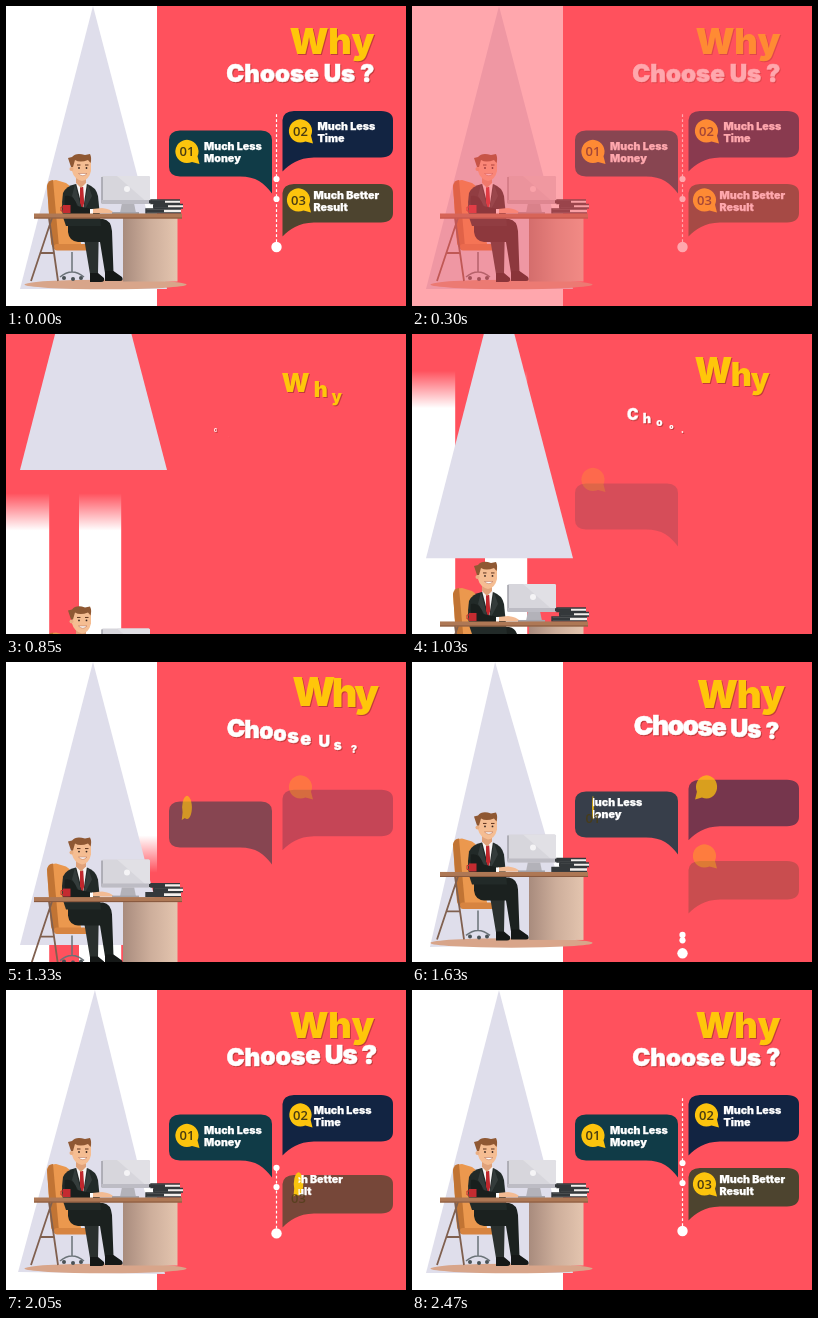
Animation of 400 by 300 pixels, one loop 2.53 s. Source, as an HTML page:

```html
<!DOCTYPE html>
<html lang="en">
<head>
<meta charset="utf-8">
<title>Why Choose Us ?</title>
<style>
html, body { margin: 0; width: 100%; height: 100%; overflow: hidden; background: #ff515d; }
svg { display: block; width: 100vw; height: 100vh; }
text { font-family: Inter, "Open Sans", sans-serif; font-weight: 900; }
.why { font-size: 36.2px; fill: #ffc60a; }
.choose { font-size: 24.1px; fill: #fff; stroke: #fff; stroke-width: .5px; }
.letters { filter: drop-shadow(1px 1px .6px rgba(120, 30, 20, .45)); }
.label { font-size: 10.7px; fill: #fff; stroke: #fff; stroke-width: .25px; }
.num { font: 600 13px "Open Sans", sans-serif; fill: #4a3c12; text-anchor: middle; }
.ruler { visibility: hidden; text-anchor: end; }
</style>
</head>
<body>
<svg viewBox="0 0 400 300">
  <defs>
    <linearGradient id="up" x2="0" y2="1">
      <stop offset="0" stop-color="#fff" stop-opacity="0"/>
      <stop offset=".11" stop-color="#fff"/>
    </linearGradient>
    <linearGradient id="down" x2="0" y2="1">
      <stop offset=".89" stop-color="#fff"/>
      <stop offset="1" stop-color="#fff" stop-opacity="0"/>
    </linearGradient>
    <linearGradient id="wood">
      <stop offset="0" stop-color="#a88b7d"/>
      <stop offset=".5" stop-color="#cdae9b"/>
      <stop offset="1" stop-color="#e4c5af"/>
    </linearGradient>
  </defs>
  <g id="all">
    <g id="rise" fill="url(#up)">
      <rect width="43.2" height="340"/>
      <rect x="73" width="42.2" height="340"/>
    </g>
    <g id="fall" fill="url(#down)">
      <rect x="43" width="30.2" height="340"/>
      <rect x="115" width="36" height="340"/>
    </g>
    <path id="beam" d="M87 0L161 283H14Z" fill="#dfdeeb"/>

    <g id="desk">
      <ellipse cx="99.500" cy="278.500" rx="81" ry="4.800" fill="#d8a58a"/>
      <!-- chair -->
      <path d="M66 246V266M54 271Q66 261 78 271" fill="none" stroke="#6b7378" stroke-width="1.500"/>
      <g fill="#4a5256">
        <circle cx="58" cy="272" r="2"/><circle cx="67" cy="273" r="2"/><circle cx="75" cy="272" r="2"/>
      </g>
      <path d="M41 180Q42 174 50 174L60 177Q66 180 68 192L75 238Q75 244 69 244H52Q46 243 45 236Z" fill="#eb984e"/>
      <path d="M41 180Q42 174 47 174L53 241L50 243Q46 242 45 236Z" fill="#c17434"/>
      <rect x="48" y="238" width="36" height="6.500" rx="3" fill="#d78440"/>
      <!-- legs -->
      <path d="M74 214H93L92 268H84L79 238Z" fill="#2a302e"/>
      <path d="M62 213H97Q105 214 106 225L107.500 267H99L94 236H72Q63 235 62 226Z" fill="#1b211f"/>
      <path d="M99 265H107.500L116 271Q118 275 114 275H99ZM84 267H92L98 272Q99 276 95 276H84Z" fill="#151817"/>
      <!-- body -->
      <path d="M57 187Q60 180 70 178H81Q90 181 92 190L95 220H60Q54 206 57 187Z" fill="#222a28"/>
      <path d="M70 177H81L77 204Z" fill="#f6f3f3"/>
      <path d="M74 181H77.200L78.200 197L76.300 203L74 197Z" fill="#c0272d"/>
      <path d="M69 178L76.500 207L66 190ZM82 178L77 207L86 190Z" fill="#343c3b"/>
      <path d="M70 169H80V177L75 182L70 177Z" fill="#e0a27a"/>
      <!-- head -->
      <path d="M66 155Q66 150 75 150T85 155V165Q83 174 76 175Q68 173 66 165Z" fill="#f5bd92"/>
      <circle cx="65.500" cy="163" r="2" fill="#eaae82"/>
      <path d="M65 161L62 152L66 151Q70 146 79 149L84 148Q86 152 84.500 157L82 154Q74 157 69 154L67 161Z" fill="#8f5833"/>
      <path d="M71 159H74.500M79 159H82.500" stroke="#60351f"/>
      <circle cx="73" cy="162" r=".9" fill="#35241d"/><circle cx="80.500" cy="162" r=".9" fill="#35241d"/>
      <path d="M72.500 167.500Q77 172 81 167.500Z" fill="#fff" stroke="#b5684c" stroke-width=".5"/>
      <!-- arms -->
      <path d="M59 190Q68 188 71 200L86 203V209H65Q57 203 59 190Z" fill="#191f1d"/>
      <path d="M86 203L96 202Q105 203 108 207H86Z" fill="#f3bb93"/>
      <path d="M84 203H87V208H84Z" fill="#fff"/>
      <!-- screen -->
      <path d="M116 197H128L130 207H114Z" fill="#b3b2b9"/>
      <rect x="95.500" y="170" width="48.500" height="28" rx="1.500" fill="#d7d6dc"/>
      <path d="M111 170H142.500Q144 170 144 172V196.500L143 198Z" fill="#e1e0e5"/>
      <path d="M96 171V197" stroke="#84848d"/>
      <path d="M95.500 194H144V198H95.500Z" fill="#bdbcc4"/>
      <circle cx="121" cy="183" r="3" fill="#f5f4f6"/>
      <path d="M106 206H133V208H106Z" fill="#a4a3aa"/>
      <!-- books -->
      <g fill="#f3efec" stroke="#34383b" stroke-width="1.400">
        <path d="M174 194H145V197.500H174M177 198.500H148V202H177M175 203H140V207H175"/>
      </g>
      <path d="M143 195.800H159M147 200.200H162M140 205H158" stroke="#34383b" stroke-width="3"/>
      <!-- mug and table -->
      <path d="M57 199H64.500V207H57Z" fill="#c42b30"/>
      <path d="M57 201H55V205H57" fill="none" stroke="#c42b30"/>
      <path d="M46 212L25 275M43 212L52 275M34 247H48" fill="none" stroke="#80604f" stroke-width="1.800"/>
      <rect x="117" y="212" width="54.500" height="63.500" fill="url(#wood)"/>
      <rect x="28" y="207.500" width="148" height="5" fill="#ae7855"/>
      <path d="M28 212H176" stroke="#87583d"/>
    </g>

    <g id="cards"></g>

    <line id="line" x1="270.500" x2="270.500" stroke="#fff" stroke-width="1.200" stroke-dasharray="2.700 2.300"/>
    <g id="dots" fill="#fff">
      <circle cx="270.500" r="3.100"/><circle cx="270.500" r="3.100"/><circle cx="270.500" r="5.200"/>
    </g>
    <g id="title"></g>
  </g>
</svg>
<script>
const LOOP = 2530;
const $ = id => document.getElementById(id);
const seg = (t, start, dur) => Math.min(1, Math.max(0, (t - start) / dur));
const left = (u, k = 2) => (1 - u) ** k;
const outBack = u => 1 + 2.7 * (u - 1) ** 3 + 1.7 * (u - 1) ** 2;
const move = (el, x, y, more = '') => el.setAttribute('transform', `translate(${x} ${y})${more}`);

function add(parent, tag, attrs, text) {
  const el = document.createElementNS('http://www.w3.org/2000/svg', tag);
  for (const k in attrs) el.setAttribute(k, attrs[k]);
  if (text) el.textContent = text;
  parent.appendChild(el);
  return el;
}

// Letters grow one after another from the lower left
const letters = [];
function addTitle(cls, str, baseline, cy, start, gap, dx, dy) {
  const ruler = add($('title'), 'text', { class: cls + ' ruler', x: 368.5, y: baseline }, str);
  const group = add($('title'), 'g', { class: 'letters' });
  let n = 0;
  [...str].forEach((ch, i) => {
    if (ch === ' ') return;
    const a = ruler.getStartPositionOfChar(i).x, b = ruler.getEndPositionOfChar(i).x;
    const el = add(group, 'text', { class: cls, 'text-anchor': 'middle', y: baseline - cy }, ch);
    letters.push({ el, x: (a + b) / 2, y: cy, start: start + gap * n++, dx, dy });
  });
}

const cards = [
  { start: 880, fill: '#103b47', bx: 181, by: 145.5, tx: 198, num: '01', lines: ['Much Less', 'Money'],
    shape: 'M174 124.500H255Q266 125 266 134V187.500C258 177 250 170.500 234 170.500H174Q163 170 163 161V134Q163 125 174 124.500Z' },
  { start: 1110, fill: '#122442', bx: 294.5, by: 125, tx: 311.5, num: '02', lines: ['Much Less', 'Time'],
    shape: 'M288 105H375Q387 105.500 387 114V142Q387 151 375 151.500H308C292 152 284 158 276.500 165.500V114Q277 105.500 288 105Z' },
  { start: 1360, fill: '#4d442f', bx: 292.5, by: 194, tx: 307.5, num: '03', lines: ['Much Better', 'Result'],
    shape: 'M288 178H375Q387 178.500 387 187V207Q387 216 375 216.500H308C292 217 284 223 276.500 230.500V187Q277 178.500 288 178Z' }
];

function addCard(c, i) {
  const g = add($('cards'), 'g', {});
  c.panel = add(g, 'path', { d: c.shape, fill: c.fill });
  c.badge = add(g, 'path', { d: 'M10.500 4.800L12.500 12.500L5 10.400A11.600 11.600 0 1 1 10.500 4.800Z', fill: '#fcc40d' });
  const clip = add(g, 'clipPath', { id: 'clip' + i });
  add(clip, 'rect', { x: c.bx, y: c.by - 20, width: 110, height: 40 });
  const box = add(g, 'g', { 'clip-path': `url(#clip${i})` });
  c.text = add(box, 'g', { class: 'label' });
  c.lines.forEach((s, n) => add(c.text, 'text', { x: c.tx, y: c.by - 1.5 + 12 * n }, s));
  c.label = add(g, 'text', { class: 'num', x: c.bx, y: c.by + 4.7 }, c.num);
}

function drawCard(c, time) {
  const t = time - c.start;
  const p = seg(t, 0, 900);
  move(c.panel, 0, 30 * (1 - p));
  c.panel.setAttribute('opacity', p);
  const turn = Math.cos(2 * Math.PI * (1 - left(seg(t, 270, 750), 1.4)));
  move(c.badge, c.bx, c.by, ` scale(${turn} 1)`);
  c.badge.setAttribute('opacity', seg(t, 0, 700));
  const u = seg(t, 510, 550);
  move(c.text, -80 * left(u), 0);
  c.text.setAttribute('opacity', u > 0 ? 1 : 0);
  const n = seg(t, 520, 400);
  move(c.label, 0, 25 * (1 - n));
  c.label.setAttribute('opacity', Math.min(1, 1.5 * n));
}

function draw(now) {
  const leaving = now < 600;
  const t = leaving ? LOOP : now;
  $('all').setAttribute('opacity', leaving ? (1 + Math.cos(Math.PI * seg(now, 30, 540))) / 2 : 1);

  move($('rise'), 0, -38 + 340 * (1 - seg(t, 640, 500)));
  move($('fall'), 0, -342 * (1 - seg(t, 1050, 450)));
  const swing = -1.8 * Math.sin(2 * Math.PI * seg(t, 1400, 700));
  move($('beam'), 0, -300 * left(seg(t, 640, 700)), ` rotate(${swing} 87 141)`);
  move($('desk'), 0, 170 * left(seg(t, 697, 1060)));
  cards.forEach(c => drawCard(c, t));

  const spread = 1 - left(seg(t, 1538, 630));
  const place = y => 310 + (y - 310) * spread;
  [173, 193, 241].forEach((y, i) => $('dots').children[i].setAttribute('cy', place(y)));
  $('line').setAttribute('y1', place(241));
  $('line').setAttribute('y2', place(241) - 134 * seg(t, 1800, 500));

  for (const l of letters) {
    const p = outBack(seg(t, l.start, 1320));
    const s = Math.max(0, p);
    move(l.el, l.x + l.dx * (1 - p), l.y + l.dy * (1 - p), ` scale(${s})`);
    l.el.setAttribute('opacity', s > .001 ? 1 : 0);
  }
}

// The picture advances in steps of 60 ms with two longer holds
function step(t) {
  if (t < 600) return Math.min(480, Math.floor(t / 60) * 60);
  if (t < 730) return 600;
  return 10 + Math.floor((t - 10) / 60) * 60;
}

addTitle('why', 'Why', 48, 37, 580, 60, -48, 48);
addTitle('choose', 'Choose Us ?', 76, 68, 799, 48, -24, 35);
cards.forEach(addCard);

const begin = performance.now();
function tick() {
  draw(step((performance.now() - begin) % LOOP));
  requestAnimationFrame(tick);
}
tick();
</script>
</body>
</html>
```
